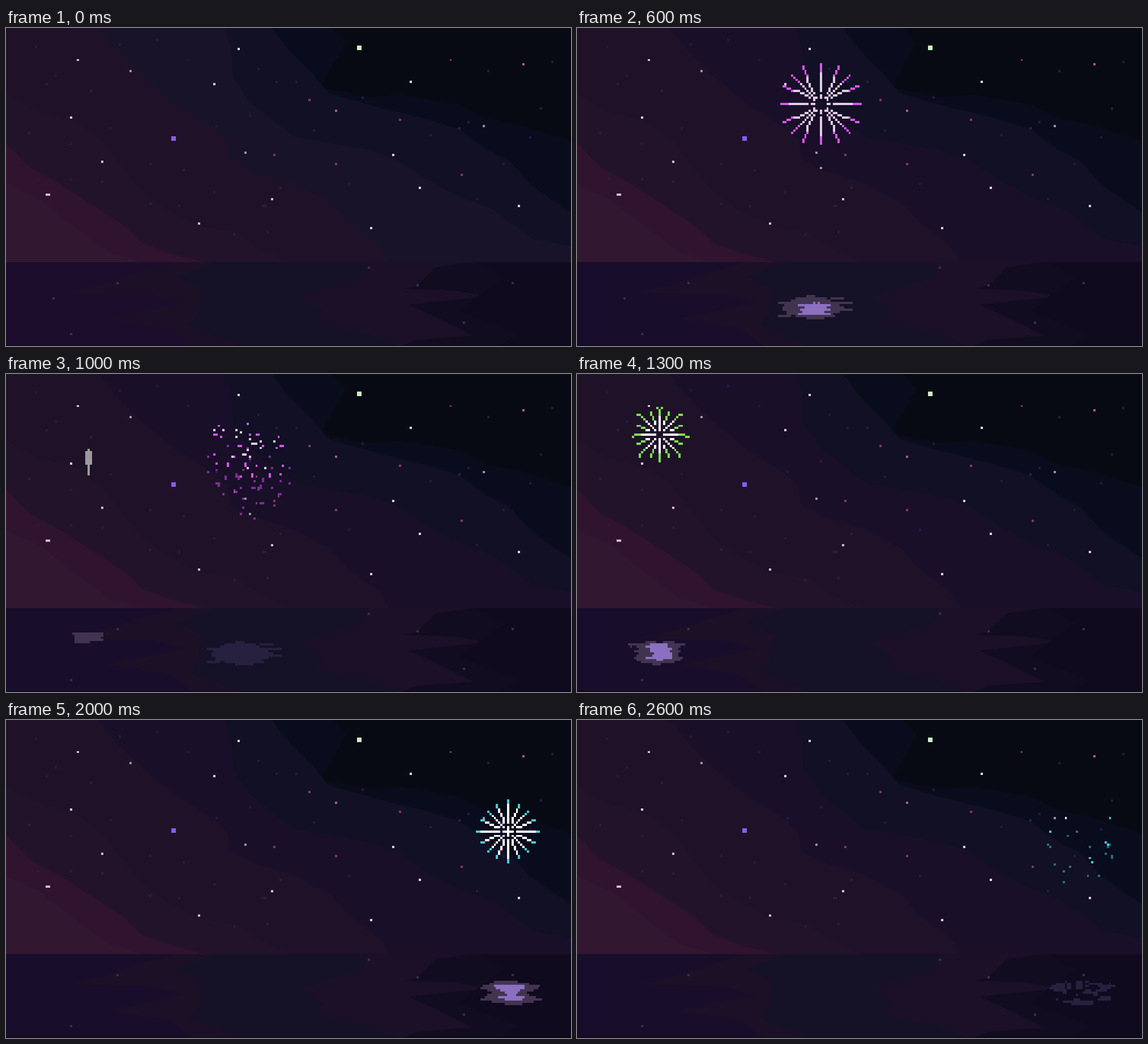
An HTML page without scripts that plays this animation: 998 by 561 pixels, repeating every 2700 ms.

```html
<!DOCTYPE html>
<html lang="en">
<head>
<meta charset="utf-8">
<title>Pixel fireworks over water</title>
<style>
html, body { margin: 0; width: 100%; height: 100%; overflow: hidden; background: #080a14; }
svg { display: block; width: 100vw; height: 100vh; }
.px { fill: none; stroke: currentColor; stroke-width: 1; stroke-linecap: square; }
.core { stroke: var(--core, #fff); }
.dim { opacity: .5; }
.outer { stroke: var(--outer, #423451); }
.inner { stroke: var(--inner, #8b6fc0); }
.faded { --outer: #28203f; --inner: #28203f; }
.pink { color: #d955ee; --core: #e2cbe8; }
.green { color: #7ee050; }
.cyan { color: #42cfdc; }

/* --t: first tick shown (100 ms each), --d: how many ticks it stays */
.at {
  visibility: hidden;
  animation: var(--d, d1) 2.7s step-end calc(var(--t) * .1s - 2.705s) infinite;
}
@keyframes d1 { 0% { visibility: visible } 3.7037%, to { visibility: hidden } }
@keyframes d2 { 0% { visibility: visible } 7.4074%, to { visibility: hidden } }
@keyframes d3 { 0% { visibility: visible } 11.1111%, to { visibility: hidden } }
@keyframes d4 { 0% { visibility: visible } 14.8148%, to { visibility: hidden } }
@keyframes d5 { 0% { visibility: visible } 18.5185%, to { visibility: hidden } }
@keyframes d10 { 0% { visibility: visible } 37.037%, to { visibility: hidden } }
@keyframes d11 { 0% { visibility: visible } 40.7407%, to { visibility: hidden } }

.tint { animation: tint 2.7s step-end -2.705s infinite; }
@keyframes tint { 0% { fill: var(--first) } 3.7037%, to { fill: var(--rest) } }
</style>
</head>
<body>
<svg viewBox="0 0 998 561" preserveAspectRatio="none" shape-rendering="crispEdges">
<defs>
  <!-- Bursts: one eighth, mirrored three times -->
  <g id="seed" class="px">
    <path d="M3 0h0M-3 0h0M0 3v0M0 -3v0M2 2h0M-2 2h0M2 -2h0M-2 -2h0"/>
    <path class="core" d="M-1 0h2M0 -1v2"/>
  </g>
  <g id="small" class="px">
    <g id="small-half">
      <g id="small-quarter">
        <g id="small-eighth">
          <path d="M6 0h2M5 2h1M7 3h0M5 5h0m1 1h0"/>
          <path class="core" d="M0 0h1M3 0h1M2 2h0m1 1h0"/>
        </g>
        <use href="#small-eighth" transform="matrix(0 1 1 0 0 0)"/>
      </g>
      <use href="#small-quarter" transform="scale(-1 1)"/>
    </g>
    <use href="#small-half" transform="scale(1 -1)"/>
  </g>
  <g id="medium" class="px">
    <g id="medium-half">
      <g id="medium-quarter">
        <g id="medium-eighth">
          <path d="M13 0h1M11 5h1M8 8h0m1 1h0"/>
          <path class="core" d="M0 0h2M4 0h8M4 2h2M7 3h1M9 4h1M2 2h0m1 1h0m1 1h0m1 1h0m1 1h0m1 1h0"/>
        </g>
        <use href="#medium-eighth" transform="matrix(0 1 1 0 0 0)"/>
      </g>
      <use href="#medium-quarter" transform="scale(-1 1)"/>
    </g>
    <use href="#medium-half" transform="scale(1 -1)"/>
  </g>
  <g id="large" class="px">
    <g id="large-half">
      <g id="large-quarter">
        <g id="large-eighth">
          <path d="M15 0h3M16 8h1M14 7h1M13 6h0M10 10h0m1 1h0m1 1h0m1 1h0"/>
          <path class="core" d="M3 0h1M6 0h8M10 6h2M8 5h1M6 4h1M5 3h0M3 2h0M3 3h0m1 1h0m1 1h0m1 1h0m1 1h0m1 1h0m1 1h0"/>
        </g>
        <use href="#large-eighth" transform="matrix(0 1 1 0 0 0)"/>
      </g>
      <use href="#large-quarter" transform="scale(-1 1)"/>
    </g>
    <use href="#large-half" transform="scale(1 -1)"/>
  </g>
  <g id="compact" class="px">
    <g id="compact-half">
      <g id="compact-quarter">
        <g id="compact-eighth">
          <path d="M9 0h2M7 3h1M9 4h1M7 7h0m1 1h0m1 1h0"/>
          <path class="core" d="M2 0h6M5 2h1M2 2h0m1 1h0m1 1h0m1 1h0m1 1h0"/>
        </g>
        <use href="#compact-eighth" transform="matrix(0 1 1 0 0 0)"/>
      </g>
      <use href="#compact-quarter" transform="scale(-1 1)"/>
    </g>
    <use href="#compact-half" transform="scale(1 -1)"/>
  </g>

  <!-- Falling remains -->
  <path id="embers" class="px dim" d="M-4 1h0M5 2h0M-13 6h0M-13 13h0M-9 12h0M3 12h0M16 11h0M-5 15h0M0 14v1M1 15v1M9 15h0M12 16v1M-9 18h1M-8 19h0M7 20h1M-6 23h0M-1 22h1M3 29h0M9 27h0"/>
  <g id="sparks" class="px">
    <use href="#embers"/>
    <path d="M-8 -8h0M5 -9h0M-10 -4h1M-7 -3h0M9 -4h1M12 1h0M-10 5h0M-9 9h0M-4 9v1M4 9v1M9 10h0"/>
    <path class="core" d="M-6 -6h0M0 -6h0M0 -3h0M2 -5h0M6 -2h0M7 0h1M-2 6h0M6 6h0"/>
  </g>

  <!-- Rocket and its mirror images -->
  <path id="rocket" class="px" color="#9c9a9f" d="M0 0v11M-1 1v5M1 1v5"/>
  <g id="launch">
    <use href="#rocket"/>
    <path class="px" color="#9c9a9f" d="M0 12v1"/>
    <path class="px" color="#3d3049" d="M-1 23h2M-3 24h6M-1 25h2M-3 26h6M-2 27h4M0 28v1"/>
  </g>
  <path id="rocket-glow" class="px" color="#423451" d="M-6 0h13M-5 1h12M-5 2h11M-5 3h12M-5 4h6"/>

  <g id="ripple" class="px">
    <path class="outer" d="M-8 0h12M-3 1h3M-3 2h9M-7 3h13M-3 4h4M-5 5h10M-2 6h2"/>
    <path class="inner" d="M-2 1h0M-3 3h4M-2 5h2"/>
  </g>
  <g id="pink-glow" class="px">
    <path class="outer" d="M104 121h3M99 122h13M115 122h5M97 123h17M91 124h33M94 125h24M93 126h27M93 127h31M95 128h23M95 129h20M91 130h5M99 130h17M104 131h7"/>
    <path class="inner" d="M107 124h0M109 124h0M100 125h14M103 126h9M101 127h13M102 128h9M100 129h14"/>
  </g>
  <g id="green-glow" class="px">
    <path class="outer" d="M31 121h4M39 121h4M23 122h25M24 123h0M27 123h19M28 124h17M26 125h20M28 126h17M27 127h18M26 128h21M27 129h19M29 130h14M34 131h3"/>
    <path class="inner" d="M33 122h7M31 123h9M33 124h9M33 125h8M35 126h7M34 127h8M31 128h11M36 129h2"/>
  </g>
  <g id="cyan-glow" class="px">
    <path class="outer" d="M221 118h10M219 119h17M216 120h25M215 121h25M218 122h20M220 123h15M218 124h18M217 125h22M215 126h27M220 127h18M226 128h7"/>
    <path class="inner" d="M221 120h13M222 121h12M224 122h8M226 123h5M227 124h3M223 125h11M226 126h7"/>
  </g>
</defs>

<!-- Sky, from the dark corner to the warm one -->
<rect width="998" height="561" fill="#080a13"/>
<path fill="#090c1c" d="M575 0 600 25 555 105 640 122 700 118 800 135 850 160 910 172 998 200V413H0V0z"/>
<path fill="#111024" d="M470 0 500 40 545 85 570 115 640 135 740 160 800 178 850 215 890 235 925 275 960 300 998 325V413H0V0z"/>
<path class="tint" style="--first:#181329;--rest:#190f29" d="M385 0 398 35 400 85 430 130 480 170 510 192 640 215 690 232 740 265 790 293 860 320 900 350 930 372 998 385V413H0V0z"/>
<path fill="#1f1228" d="M163 0 195 40 240 85 295 130 370 178 392 200 395 230 430 250 510 275 575 310 605 345 660 385 675 413H0V0z"/>
<path fill="#23132a" d="M0 117 50 147 120 165 165 195 200 240 240 290 290 325 340 350 410 362 440 385 500 413H0z"/>
<path fill="#2f132f" d="M0 203 40 245 95 275 165 320 210 350 240 380 300 400 350 413H0z"/>
<path fill="#321731" d="M0 275 60 303 120 350 180 395 240 413H0z"/>

<!-- Water -->
<rect y="413" width="998" height="148" fill="#151126"/>
<path fill="#1c1027" d="M0 413H370L300 440 345 460 340 505 320 525 410 561H0z"/>
<path class="tint" style="--first:#1c0d2c;--rest:#180d2a" d="M0 413H300L240 430 180 450 110 467 260 470 315 485 180 513 290 530 330 561H0z"/>
<path fill="#1b1027" d="M998 413H640L630 440 580 455 520 475 560 500 545 520 640 540 690 561H998z"/>
<path fill="#110c20" d="M998 413H820L760 422 725 455 700 460 790 463 853 473 710 488 760 510 800 530 825 543 725 550 700 561H998z"/>
<path fill="#0f0a1d" d="M998 413H830L880 440 830 475 800 500 905 540 870 561H998z"/>
<rect y="560" width="998" height="1" fill="#08060f"/>

<g transform="scale(3.8984 3.8958) translate(.5 .5)">
  <!-- Stars -->
  <g class="px">
    <path color="#1f1d48" d="M68 5h0M51 7h0M13 8h0M22 21h0M82 14h0M47 45h0M95 44h0M114 18h0M161 31h0M192 48h0M237 49h0M242 36h0M155 70h0M213 77h0"/>
    <path color="#2a1f3b" d="M18 25h0M38 28h0M10 47h0M29 52h0M14 68h0M29 68h0M43 69h0M65 61h0M80 64h0M65 79h0M78 80h0M94 74h0M103 93h0M118 92h0M116 80h1M124 72h0"/>
    <path color="#221e3a" d="M110 39h0M122 24h0M131 24h0M139 46h0M218 19h0M247 15h0M209 42h0M225 61h0"/>
    <path color="#351f50" d="M205 45h0"/>
    <path color="#3d2c4b" d="M164 108h0M186 116h0M229 115h0M207 133h0M50 115h0M29 138h0"/>
    <path color="#3d2c4b" class="at" style="--t:0;--d:d10" d="M21 122h0"/>
    <path color="#83386a" d="M137 32h0M201 14h0M178 41h0M121 57h0M149 61h0M206 66h0"/>
    <path color="#a858a8" d="M234 16h0M149 37h0"/>
    <path color="#9a94a3" d="M56 19h0M108 56h0M216 44h0"/>
    <path color="#9a94a3" class="at" style="--t:2;--d:d11" d="M110 63h0"/>
    <path color="#f0c8e6" d="M32 14h0M105 9h0M94 25h0M29 40h0M175 57h0M165 90h0M232 80h0"/>
    <path color="#d8b6d6" d="M43 60h0M87 88h0M120 77h0M18 75h1"/>
    <path color="#d6eec6" d="M183 24h0M187 72h0"/>
    <path color="#cdf2c8" d="M159 8h1v1h-1z"/>
    <path color="#8b5cf0" d="M75 49h1v1h-1z"/>
  </g>

  <!-- Reflections -->
  <use href="#ripple" x="110" y="124" class="at" style="--t:4"/>
  <use href="#pink-glow" class="at" style="--t:5;--d:d5"/>
  <use href="#pink-glow" class="at faded" style="--t:10;--d:d3"/>
  <use href="#rocket-glow" x="36" y="117" class="at" style="--t:9;--d:d2"/>
  <use href="#ripple" x="37" y="124" class="at" style="--t:11"/>
  <use href="#green-glow" class="at" style="--t:12;--d:d4"/>
  <use href="#green-glow" class="at faded" style="--t:16;--d:d3"/>
  <use href="#rocket-glow" x="227" y="113" class="at" style="--t:17;--d:d2"/>
  <use href="#ripple" x="228" y="120" class="at" style="--t:19"/>
  <use href="#cyan-glow" class="at" style="--t:20;--d:d4"/>
  <use href="#cyan-glow" class="at faded" style="--t:24;--d:d2"/>
  <path class="px at" color="#28203f" style="--t:26" d="M221 118h0M226 118h2M230 118h1M217 119h3M222 119h1M226 119h2M232 119h5M241 119h0M215 120h5M222 120h1M226 120h2M230 120h1M236 120h7M214 121h6M222 121h1M226 121h2M237 121h4M216 122h5M230 122h2M235 122h4M220 123h1M229 123h6M226 124h0M234 124h1M237 125h4M217 126h0M225 126h2M236 126h5M220 127h13M224 128h9"/>

  <!-- Pink firework -->
  <g class="pink" transform="translate(110 34)">
    <use href="#launch" y="53" class="at" style="--t:1"/>
    <use href="#rocket" y="23" class="at" style="--t:2"/>
    <use href="#seed" class="at" style="--t:3"/>
    <use href="#small" class="at" style="--t:4"/>
    <use href="#medium" class="at" style="--t:5"/>
    <use href="#large" class="at" style="--t:6;--d:d3"/>
    <path class="px at" style="--t:8;--d:d2" d="M-1 -19h0M1 -19h0M-19 1h0M19 1h0M0 19h0"/>
    <use href="#large" y="1" class="at" style="--t:9"/>
    <g class="at" style="--t:10;--d:d2">
      <use href="#sparks" transform="translate(-6 -3)"/>
      <use href="#sparks" transform="translate(5 2) scale(-1 1)"/>
    </g>
    <g class="at" style="--t:12">
      <use href="#embers" transform="translate(-4 2)"/>
      <use href="#embers" transform="translate(5 4) scale(-1 1)"/>
    </g>
  </g>

  <!-- Green firework -->
  <g class="green" transform="translate(37 27)">
    <use href="#launch" y="60" class="at" style="--t:8"/>
    <use href="#rocket" y="30" class="at" style="--t:9"/>
    <use href="#rocket" y="7" class="at" style="--t:10"/>
    <use href="#small" class="at" style="--t:11"/>
    <use href="#compact" class="at" style="--t:12;--d:d2"/>
    <path class="px at" style="--t:13" d="M-1 -12h0M1 -12h0M-12 1h0M12 1h1M0 12h0M-10 -9h0M10 -9h0M-9 10h0M9 10h0"/>
    <use href="#compact" y="1" class="at" style="--t:14"/>
    <use href="#sparks" y="-4" class="at" style="--t:15"/>
    <use href="#sparks" y="-2" class="at" style="--t:16"/>
    <use href="#sparks" class="at" style="--t:17"/>
    <use href="#embers" y="2" class="at" style="--t:18"/>
  </g>

  <!-- Cyan firework -->
  <g class="cyan" transform="translate(227 50)">
    <use href="#launch" y="37" class="at" style="--t:16"/>
    <use href="#rocket" y="7" class="at" style="--t:17"/>
    <use href="#seed" class="at" style="--t:18"/>
    <use href="#small" class="at" style="--t:19"/>
    <use href="#medium" class="at" style="--t:20;--d:d2"/>
    <use href="#medium" y="1" class="at" style="--t:22"/>
    <use href="#medium" y="2" class="at" style="--t:23"/>
    <use href="#sparks" y="-3" class="at" style="--t:24"/>
    <use href="#sparks" y="-1" class="at" style="--t:25"/>
    <g class="px at" style="--t:26">
      <path class="dim" d="M-14 6h0M-13 7h0M-5 2h0M-1 0h0M5 7h0M14 6h0M13 7h0M12 10h0M15 11v1M-11 15h0M-4 16h0M-7 18h0M-7 23h0M4 20h0M9 20h0"/>
      <path d="M14 -6h0M-13 0h0M12 5h0M13 6h0M5 12h0M6 14h0"/>
      <path class="core" d="M-6 -6h0"/>
    </g>
  </g>
</g>
</svg>
</body>
</html>
```
